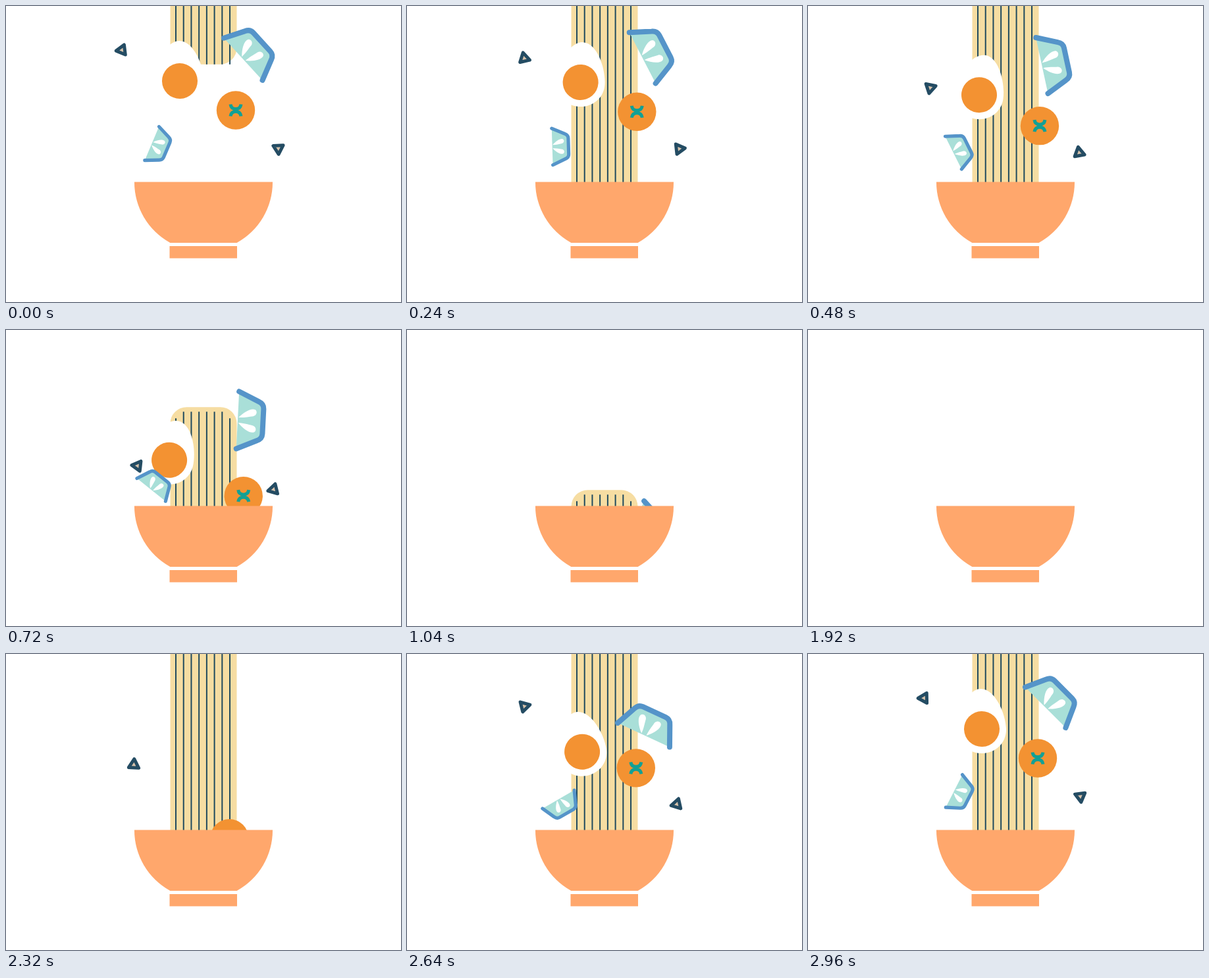
Recreate the animation shown at these times as an HTML page. Size 600 px wide and 450 px high, loop 3000 ms.

```html
<!DOCTYPE html>
<html lang="en">
<head>
<meta charset="utf-8">
<title>Noodle bowl</title>
<style>
  html, body { margin: 0; width: 100%; height: 100%; overflow: hidden; background: #fff; }
  svg { display: block; width: 100vw; height: 100vh; }
</style>
</head>
<body>
<svg viewBox="0 0 600 450">
  <defs>
    <clipPath id="aboveRim"><rect width="600" height="268.5"/></clipPath>
    <path id="seed" fill="#fff" d="M-4-1C-13-9-20-20-17-26C-14-30-8-28-7-23C-6-16-4-10-4-1Z"/>
    <g id="slice">
      <path d="M-43.5 0L-29.5-31Q-26.5-38.5-19-38.5H19Q26.5-38.5 29.5-31L43.5 0"
        fill="#a9dfd8" stroke="#5594c9" stroke-width="8" stroke-linecap="round"/>
      <use href="#seed"/>
      <use href="#seed" transform="scale(-1 1)"/>
    </g>
    <path id="chip" d="M8.8 0L-4.4 7.62V-7.62Z" fill="#d6c2ab"
      stroke="#244c63" stroke-width="5" stroke-linejoin="round"/>
  </defs>

  <g clip-path="url(#aboveRim)">
    <g id="noodles">
      <rect x="249.5" width="101" height="500" rx="25" fill="#f6dda2"/>
      <path id="strands" stroke="#1f4a5e" stroke-width="2"/>
    </g>
    <g id="egg">
      <path fill="#fff" d="M0-61C22-61 37-22 37 1C37 22 20 37 0 37C-20 37-37 22-37 1C-37-22-22-61 0-61Z"/>
      <circle r="27" fill="#f39232"/>
    </g>
    <g id="bigSlice"><use href="#slice" y="16"/></g>
    <g id="smallSlice"><use href="#slice" transform="scale(.64) translate(0 16)"/></g>
    <g id="carrot">
      <circle r="29.2" fill="#f39232"/>
      <path d="M-8-9Q-7-2 0-2Q7-2 8-9M-8 9Q-7 2 0 2Q7 2 8 9" fill="none" stroke="#12a095" stroke-width="5"/>
    </g>
    <use id="leftChip" href="#chip"/>
    <use id="rightChip" href="#chip"/>
  </g>

  <g fill="#ffa76c">
    <path d="M195 267.5H405A105 105 0 0 1 350.6 360H249.4A105 105 0 0 1 195 267.5Z"/>
    <rect x="248.5" y="365" width="102.5" height="18.5"/>
  </g>
</svg>
<script>
const LOOP = 3000;
const byId = id => document.getElementById(id);

// x, y: top of the flight; rise and fall: px below it 360 ms before and 480 ms after.
// driftIn, driftOut: sideways px per px of height; angle in degrees, spin in degrees per ms.
const toppings = [
  { id: 'egg', x: 264, y: 114, rise: 35, fall: 21, driftIn: .06, driftOut: -.19, angle: -1, spin: .02 },
  { id: 'bigSlice', x: 372, y: 70, rise: 39, fall: 17, driftIn: -.15, driftOut: -.06, angle: 47.5, spin: .063 },
  { id: 'smallSlice', x: 231, y: 213, rise: 17, fall: 5.5, driftIn: .24, driftOut: -.18, angle: 113, spin: -.103 },
  { id: 'carrot', x: 349, y: 158.5, rise: 15, fall: 23.5, driftIn: -.08, driftOut: .125, angle: 0, spin: 0 },
  { id: 'leftChip', x: 176, y: 67, rise: 12.5, fall: 57, driftIn: .18, driftOut: .17, angle: 53, spin: -.148, gravity: 2.2 },
  { id: 'rightChip', x: 413.7, y: 216.5, rise: 12, fall: 6.5, driftIn: -.33, driftOut: -.28, angle: 87, spin: .11 }
].map(item => ({ gravity: 3.4, ...item, node: byId(item.id) }));

byId('strands').setAttribute('d', Array.from({ length: 8 }, (_, i) =>
  `M${258 + i * 11.72} ${i % 7 ? 7 : 17}V500`).join(''));

function noodleTop(t) {
  if (t < 1500) return 268 - 268 * Math.pow(Math.max(0, 1200 - t) / 680, 1.64) + Math.max(0, t - 1100) * .1;
  const u = Math.min(1, Math.max(0, (t - 1920) / 400));
  return 290 - 175 * (1 - Math.cos(Math.PI * u));
}

function place(item, s) {
  const drop = s < 0
    ? item.rise * Math.pow(-s / 360, 3.3)
    : item.fall * Math.pow(s / 480, item.gravity);
  const x = item.x + drop * (s < 0 ? item.driftIn : item.driftOut);
  item.node.setAttribute('transform',
    `translate(${x} ${item.y + drop}) rotate(${item.angle + item.spin * s})`);
}

function render(t) {
  const sinceTop = t < LOOP / 2 ? t : t - LOOP;
  byId('noodles').setAttribute('transform', `translate(0 ${noodleTop(t)})`);
  toppings.forEach(item => place(item, sinceTop));
}

const start = performance.now();
function tick() {
  render((performance.now() - start) % LOOP);
  requestAnimationFrame(tick);
}
tick();
</script>
</body>
</html>
```
